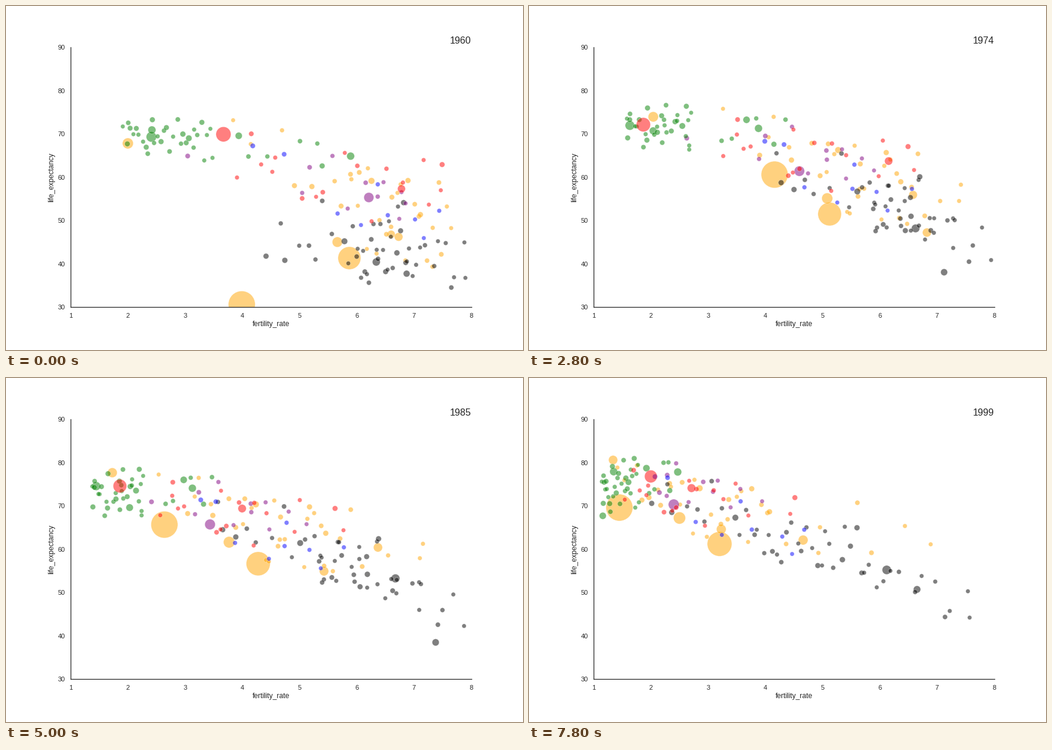
A matplotlib script that plays this animation: 864 px wide and 576 px high, repeating every 8000 ms.

```python
import numpy as np
import matplotlib.pyplot as plt
from matplotlib.animation import FuncAnimation

FRAMES, STEP = 40, 200
START_YEAR = 1960
QUANTILES = [0, 0.2, 0.8, 1]
INK = "0.15"
T = np.linspace(0, 1, FRAMES)
rng = np.random.default_rng(11)

colors, xs, ys, widths = [], [], [], []


def add(color, x, y, width):
    colors.append(color)
    xs.append(x)
    ys.append(y)
    widths.append(width)


def track(color, width, *points):
    """A large bubble passing through evenly timed points."""
    x, y = np.transpose(points)
    times = np.linspace(0, 1, len(points))
    add(color, np.interp(T, times, x), np.interp(T, times, y),
        np.linspace(*width, FRAMES))


def mix(pair, pace):
    """Blend the first state into the last along T ** pace."""
    a, b = np.array(pair, float)
    return a + (b - a) * (T ** pace)[:, None]


def group(color, count, spread, pace, fertility, life):
    """A region's smaller countries.

    fertility: x at the four quantiles, first and last year
    life: y at the lowest and highest x, and its scatter, likewise
    """
    q = mix(fertility, pace[0])
    low, high, scatter = mix(life, pace[1]).T
    for k in range(count):
        rank = (k + rng.uniform(0, 1)) / count
        drift = rng.uniform(-0.08, 0.08) * np.sin(np.pi * T)
        u = np.clip(rank + drift, 0, 1)
        x = np.array([np.interp(r, QUANTILES, row) for r, row in zip(u, q)])
        along = (x - q[:, 0]) / (q[:, 3] - q[:, 0])
        noise = np.clip(rng.normal(), -1.9, 1.9)
        y = low + (high - low) * along + scatter * noise
        width = min(7.1 + rng.exponential(spread), 13)
        add(color, x, y, np.full(FRAMES, width))


# Asia
track("orange", (44.7, 44.7), (3.99, 30.6), (6.38, 57.5), (4.50, 60.0),
      (2.30, 63.8), (2.70, 66.0), (2.17, 67.3), (1.45, 69.6))
track("orange", (38, 41), (5.87, 41.3), (5.2, 51.0), (4.2, 57.1), (3.2, 61.2))
track("orange", (17, 20), (5.66, 45.0), (5.2, 54.5), (3.65, 62.2), (2.5, 67.2))
track("orange", (18, 15), (2.00, 67.8), (2.07, 73.6), (1.7, 78.0), (1.34, 80.6))
track("orange", (13, 16), (6.60, 46.8), (6.6, 55.5), (6.35, 60.8), (4.66, 62.1))
track("orange", (14, 16), (6.73, 46.2), (6.95, 46.5), (5.3, 55.6), (3.23, 64.6))
group("orange", 33, 1.2, (1.4, 0.75),
      fertility=[(3.8, 5.8, 7.2, 7.7), (1.4, 2.2, 4.2, 7.2)],
      life=[(66, 46, 6), (74, 59, 4)])

# Africa
track("black", (13, 15), (6.34, 40.4), (6.62, 47.7), (6.68, 53.7), (6.12, 55.2))
track("black", (11, 12), (6.87, 37.7), (7.1, 38.0), (7.4, 38.5), (6.65, 50.7))
group("black", 47, 0.7, (2.4, 0.5),
      fertility=[(4.4, 5.9, 7.0, 8.0), (2.0, 3.6, 6.0, 7.75)],
      life=[(45, 43, 5.5), (73, 48, 4)])

# South America
track("purple", (16.5, 18), (6.21, 55.3), (4.7, 61.0), (3.33, 66.1), (2.4, 70.3))
group("purple", 11, 1.0, (1, 0.75),
      fertility=[(2.9, 5.4, 6.75, 6.9), (2.14, 2.3, 3.4, 4.2)],
      life=[(68, 52, 4), (75, 69, 3)])

# Europe
track("green", (17, 13), (2.41, 69.3), (1.65, 71.7), (1.43, 74.8), (1.35, 77.9))
track("green", (13, 11.5), (2.42, 70.9), (2.04, 70.8), (2.03, 69.5), (1.16, 67.7))
group("green", 38, 1.2, (0.85, 0.75),
      fertility=[(1.9, 2.25, 3.5, 6.0), (1.14, 1.25, 1.8, 2.5)],
      life=[(70.5, 64, 2.3), (74, 77, 3)])

# Oceania
group("blue", 9, 0.5, (1, 0.75),
      fertility=[(3.4, 5.5, 7.2, 7.6), (1.76, 2.6, 4.5, 4.8)],
      life=[(71, 47, 4), (78, 60, 3.5)])

# North America
group("red", 17, 0.5, (1.1, 0.75),
      fertility=[(3.9, 4.4, 7.2, 7.6), (1.54, 1.85, 3.5, 4.9)],
      life=[(66, 54, 4.5), (75.5, 65, 3)])
track("red", (13, 14), (6.78, 57.3), (6.35, 63.2), (3.8, 69.9), (2.71, 74.1))
track("red", (25, 21), (3.67, 69.9), (1.87, 71.9), (1.86, 74.8), (2.0, 76.8))

xs, ys, widths = np.array(xs), np.array(ys), np.array(widths)

plt.rcParams["font.family"] = "Liberation Sans"
fig = plt.figure(figsize=(12, 8), dpi=72, facecolor="white")
ax = fig.add_axes([0.125, 0.125, 0.775, 0.755])
ax.set(xlim=(1, 8), ylim=(30, 90))
ax.set_xlabel("fertility_rate", fontsize=12, color=INK, labelpad=3.3)
ax.set_ylabel("life_expectancy", fontsize=12, color=INK)
ax.tick_params(length=0, pad=9.5, labelsize=11, labelcolor=INK)
for side in ("top", "right"):
    ax.spines[side].set_visible(False)
for side in ("left", "bottom"):
    ax.spines[side].set(color=INK, linewidth=1.25)

dots = ax.scatter(xs[:, 0], ys[:, 0], s=widths[:, 0] ** 2, c=colors,
                  alpha=0.5, edgecolors="white", linewidths=0.57)
year = ax.set_title("", loc="right", fontsize=16, color=INK, pad=6)


def draw(i):
    dots.set_offsets(np.column_stack([xs[:, i], ys[:, i]]))
    dots.set_sizes(widths[:, i] ** 2)
    year.set_text(str(START_YEAR + i))
    return dots, year


anim = FuncAnimation(fig, draw, frames=FRAMES, interval=STEP, repeat=True)
plt.show()
```
